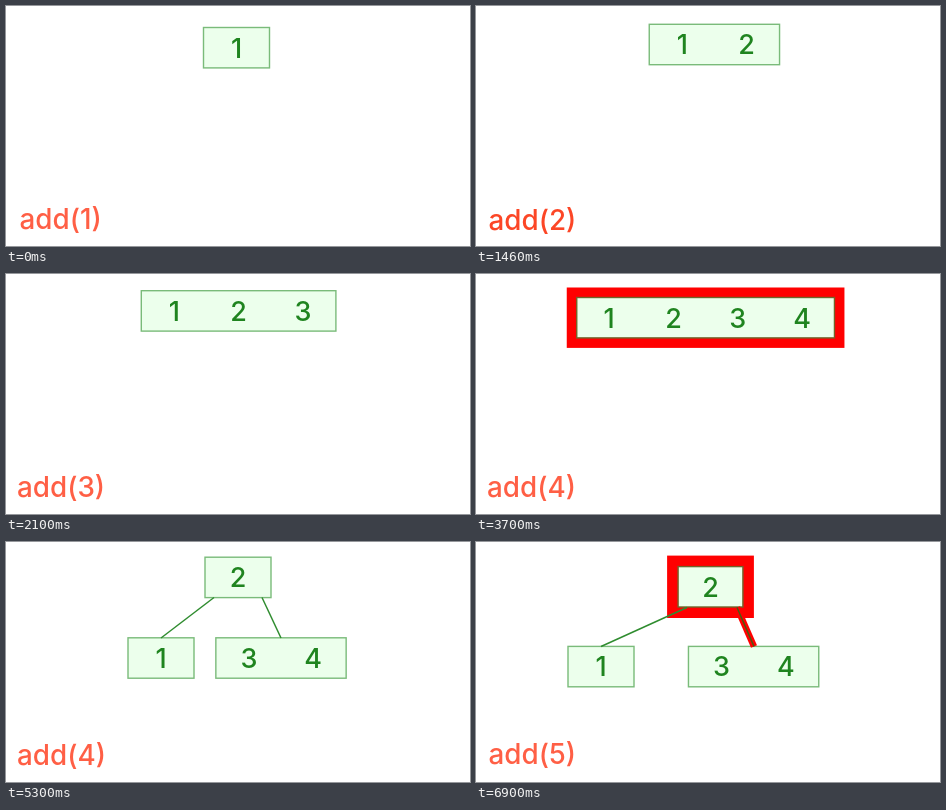
Animation, 464 px wide and 240 px high, one loop 8000 ms. Source, as an HTML page with a canvas:

```html
<!DOCTYPE html>
<html lang="en">
<head>
<meta charset="utf-8">
<title>Inserting into a 2-3-4 tree</title>
<style>
  html, body { margin: 0; width: 100%; height: 100%; overflow: hidden; background: #fff; }
  canvas { display: block; }
</style>
</head>
<body>
<canvas id="stage" width="464" height="240"></canvas>
<script>
const ctx = document.getElementById('stage').getContext('2d');
const LOOP = 8000;
const GAP = 64.3, KEY_W = 66, NODE_H = 40.4;
const GREEN = '#1f841f', FILL = '#ecffec', EDGE = '#7abb7a', RED = '#ff0000';
const CORAL = '#ff5f45', VERMILION = '#fc4626';
const FAMILY = 'Inter, "Open Sans", sans-serif';

// Node: centre x, top y, keys, optional highlight margin
const node = (cx, top, keys, mark = 0) => ({ cx, top, keys, mark });
// Link: start and end points, optional highlight
const link = (x1, y1, x2, y2, hot = false) => ({ x1, y1, x2, y2, hot });

const steps = [
  { at: 0, label: 'add(1)', x: 13.5, y: 223.3, ink: CORAL,
    nodes: [node(230.5, 21.5, '1')], links: [] },
  { at: 500, label: 'add(2)', x: 12.5, y: 223.7, ink: VERMILION,
    nodes: [node(238.4, 18.3, '12')], links: [] },
  { at: 2100, label: 'add(3)', x: 11, y: 223.2, ink: CORAL,
    nodes: [node(232.6, 16.7, '123')], links: [] },
  { at: 3700, label: 'add(4)', x: 11, y: 223.2, ink: CORAL,
    nodes: [node(229.6, 23.5, '1234', 10)], links: [] },
  { at: 5300, label: 'add(4)', x: 11, y: 223.2, ink: CORAL,
    nodes: [node(232, 15.2, '2'), node(155, 95.8, '1'), node(275, 95.8, '34')],
    links: [link(208, 55.5, 155, 96), link(256, 55.5, 275, 96)] },
  { at: 6900, label: 'add(5)', x: 12.5, y: 222.2, ink: CORAL,
    nodes: [node(234.5, 24.6, '2', 11), node(125, 104.4, '1'), node(277.6, 104.4, '34')],
    links: [link(211, 65.5, 125, 104.5), link(261, 65.5, 278, 104.5, true)] }
];

function drawNode({ cx, top, keys, mark }) {
  const w = KEY_W + GAP * (keys.length - 1) - (mark ? 1.2 : 0);
  const left = cx - w / 2;
  if (mark) {
    ctx.fillStyle = RED;
    ctx.fillRect(left - mark, top - mark, w + 2 * mark, NODE_H + 2 * mark);
  }
  ctx.fillStyle = FILL;
  ctx.fillRect(left, top, w, NODE_H);
  ctx.strokeStyle = mark ? '#70642a' : EDGE;
  ctx.lineWidth = 1.4;
  ctx.strokeRect(left, top, w, NODE_H);

  ctx.fillStyle = GREEN;
  ctx.font = `500 27px ${FAMILY}`;
  ctx.textAlign = 'center';
  [...keys].forEach((key, i) => {
    ctx.fillText(key, cx + (i - (keys.length - 1) / 2) * GAP, top + 30);
  });
}

function strokeLine({ x1, y1, x2, y2 }, color, width) {
  ctx.strokeStyle = color;
  ctx.lineWidth = width;
  ctx.beginPath();
  ctx.moveTo(x1, y1);
  ctx.lineTo(x2, y2);
  ctx.stroke();
}

function drawLink(l) {
  if (l.hot) strokeLine(l, RED, 6.5);
  strokeLine(l, l.hot ? '#4a5a10' : '#2f8c2f', 1.5);
}

function draw(time) {
  const t = time % LOOP;
  const step = steps.filter(s => s.at <= t).pop();
  ctx.fillStyle = '#fff';
  ctx.fillRect(0, 0, 464, 240);
  step.nodes.forEach(drawNode);
  step.links.forEach(drawLink);
  ctx.fillStyle = step.ink;
  ctx.font = `500 27.8px ${FAMILY}`;
  ctx.textAlign = 'left';
  ctx.fillText(step.label, step.x, step.y);
}

const start = performance.now();
function tick() {
  draw(performance.now() - start);
  requestAnimationFrame(tick);
}
tick();
</script>
</body>
</html>
```
